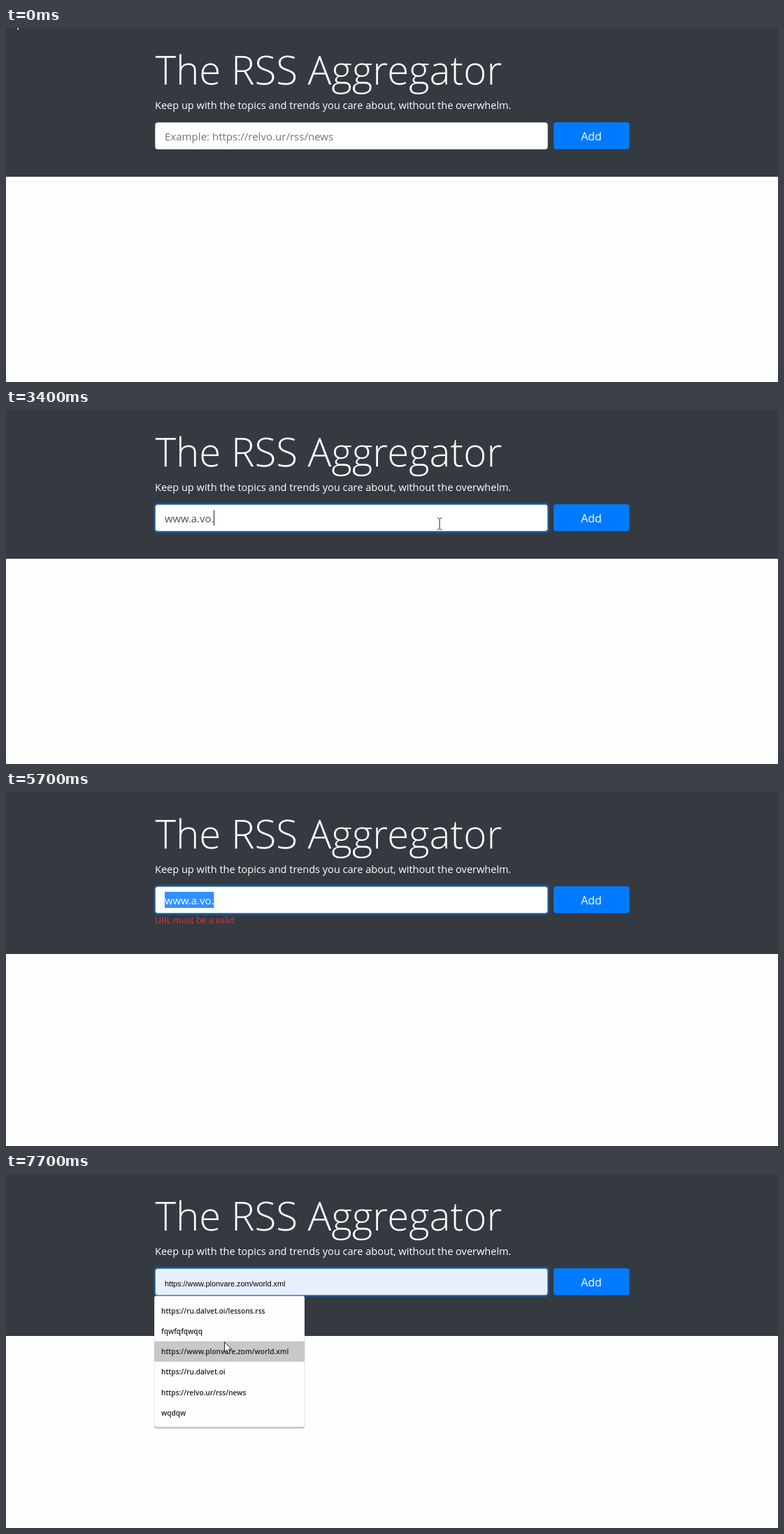
Animation of 1104 by 507 pixels, one loop 8000 ms. Source, as an HTML page:

```html
<!DOCTYPE html>
<html lang="en">
<head>
<meta charset="utf-8">
<title>Feed reader</title>
<style>
  html, body { margin: 0; width: 100%; height: 100%; overflow: hidden; background: #fefefe; }
  svg { display: block; width: 1104px; height: 507px; font-family: "Open Sans", "Noto Sans", sans-serif; }
  text { white-space: pre; }
  .title { font-size: 56.4px; font-weight: 300; fill: #fff; }
  .lead { font-size: 14.55px; fill: #fff; }
  .hint { font-size: 15.05px; fill: #6c757d; }
  .value { font-size: 14.8px; fill: #495057; }
  .preview { font: 10.85px "Liberation Sans", Arial, sans-serif; fill: #000; }
  .add { font-size: 16px; fill: #fff; text-anchor: middle; }
  .error { font-size: 12.4px; fill: #dc3545; }
  .item { font-size: 10.1px; font-weight: 600; fill: #202124; }
</style>
</head>
<body>
<svg viewBox="0 0 1104 507">
  <rect width="1104" height="507" fill="#fefefe"/>
  <rect id="header" width="1104" height="213" fill="#343a40"/>
  <text class="title" x="213.5" y="81">The RSS Aggregator</text>
  <text class="lead" x="213" y="116">Keep up with the topics and trends you care about, without the overwhelm.</text>

  <rect id="ring" x="211" y="132.5" width="566" height="44" rx="5" fill="#007bff" fill-opacity=".35"/>
  <rect id="field" x="213.5" y="135.5" width="561" height="38" rx="3.5" fill="#fff" stroke-width=".85"/>
  <rect id="selection" x="227" y="143" height="23" fill="#3390ff"/>
  <text id="hint" class="hint" x="227" y="161">Example: https://relvo.ur/rss/news</text>
  <text id="value" class="value" x="227" y="161"></text>
  <text id="preview" class="preview" x="227" y="161"></text>
  <rect id="caret" y="143.5" width="1" height="22" fill="#222"/>

  <rect id="button" x="783" y="135" width="108.5" height="38.5" rx="4"/>
  <text class="add" x="837" y="160.5">Add</text>
  <text id="error" class="error" x="213" y="188">URL must be a valid</text>

  <g id="menu">
    <rect x="212" y="175.5" width="215" height="189" rx="3" fill="#000" fill-opacity=".25"/>
    <rect x="212" y="174.5" width="215" height="188" rx="3" fill="#fefefe" stroke="#000" stroke-opacity=".1"/>
    <rect id="active" x="212" width="215" height="29.3" fill="#c8c8c8"/>
  </g>

  <path id="arrow" d="M0 0V14.5L3.4 11.4L5.7 16.6L8 15.6L5.8 10.5H10.4Z" fill="#fff" stroke="#111" stroke-width=".9"/>
  <path id="beam" d="M-3 -8H-.6M.6 -8H3M0 -7.5V7.5M-3 8H-.6M.6 8H3" fill="none" stroke="#222"/>
  <path id="hand" d="M-1.6 1.6a1.6 1.6 0 0 1 3.2 0v5l4.2 1q2 .5 2 2.4v3.2l-1.6 5.3h-7l-4-6.4q-.7-1.7 .9-1.9l2.3 1.6z" fill="#fff" stroke="#111" stroke-width=".9"/>
</svg>
<script>
const LOOP = 8000;
const ITEMS = [
  "https://ru.dalvet.oi/lessons.rss", "fqwfqfqwqq", "https://www.plonvare.zom/world.xml",
  "https://ru.dalvet.oi", "https://relvo.ur/rss/news", "wqdqw"
];
const BLUE = "#007bff", HOVER = "#0069d9", PRESSED = "#0066d4";
const PITCH = 29.25, MENU_TOP = 181;
const TYPED = "www.a.vo.";

const el = {};
document.querySelectorAll("[id]").forEach(node => el[node.id] = node);

ITEMS.forEach((label, i) => {
  const item = document.createElementNS("http://www.w3.org/2000/svg", "text");
  item.setAttribute("class", "item");
  item.setAttribute("x", 222);
  item.setAttribute("y", 199.5 + i * PITCH);
  item.textContent = label;
  el.menu.append(item);
});

const REST = {
  pointer: "arrow", at: [11, -13], chars: 0, caret: false, focus: 0,
  menu: false, active: -1, button: BLUE, error: false, selected: false
};

// Each step changes only the listed parts.
const STEPS = [
  [800, { pointer: "" }],
  [1100, { menu: true }],
  [1300, { focus: .6 }],
  [1400, { focus: 1, caret: true }],
  [1700, { menu: false, chars: 1 }],
  [1800, { chars: 2 }],
  [1900, { chars: 3 }],
  [2200, { chars: 4 }],
  [2300, { chars: 5 }],
  [2500, { chars: 7 }],
  [2700, { chars: 9 }],
  [3100, { caret: false }],
  [3300, { caret: true, pointer: "beam", at: [296, 156] }],
  [3400, { at: [620, 163] }],
  [3500, { pointer: "hand", at: [888, 165], button: HOVER }],
  [3700, { caret: false, at: [872, 155] }],
  [3800, { at: [861, 147.5] }],
  [4100, { focus: .6, button: PRESSED }],
  [4200, { focus: .1 }],
  [4300, { focus: 0, error: true }],
  [4400, { button: HOVER }],
  [4700, { pointer: "beam", at: [740, 156], button: BLUE }],
  [4800, { at: [500, 156] }],
  [4900, { at: [296, 156] }],
  [5400, { focus: .6, caret: true }],
  [5500, { focus: 1, pointer: "" }],
  [5700, { selected: true, caret: false }],
  [6000, { selected: false, chars: 0, caret: true }],
  [6500, { caret: false }],
  [6900, { menu: true, caret: true }],
  [7400, { pointer: "arrow", at: [318, 297], active: 3, caret: false }],
  [7500, { at: [316, 278] }],
  [7600, { at: [314, 258], active: 2 }],
  [7700, { at: [312.5, 240.5] }]
];

function stateAt(time) {
  const state = { ...REST };
  for (const [start, change] of STEPS) {
    if (start <= time) Object.assign(state, change);
  }
  // The pointer travels from the corner to the field in 100 ms hops.
  if (time < 800) {
    const p = Math.max(0, Math.floor(time / 100) - 1) / 7;
    state.at = [11 + 285 * p, -13 + 165 * p];
  }
  return state;
}

function set(node, attrs) {
  for (const name in attrs) node.setAttribute(name, attrs[name]);
}

function show(node, on) {
  node.style.display = on ? "" : "none";
}

function draw(time) {
  const s = stateAt(time);
  const filled = s.active >= 0;

  set(el.header, { height: s.error ? 232 : 213 });
  show(el.error, s.error);
  set(el.button, { fill: s.button, stroke: s.button === PRESSED ? "#005cbf" : "none" });

  set(el.ring, { opacity: s.focus });
  set(el.field, { stroke: s.focus ? "#5a94d0" : "#ced4da", fill: filled ? "#e8f0fe" : "#fff" });

  show(el.hint, !s.chars && !filled);
  el.value.textContent = TYPED.slice(0, s.chars);
  el.value.style.fill = s.selected ? "#fff" : "";
  el.preview.textContent = filled ? ITEMS[s.active] : "";

  const width = s.chars ? el.value.getComputedTextLength() : 0;
  show(el.selection, s.selected);
  set(el.selection, { width });
  show(el.caret, s.caret);
  set(el.caret, { x: Math.round(227 + width) });

  show(el.menu, s.menu);
  show(el.active, filled);
  set(el.active, { y: MENU_TOP + s.active * PITCH });

  for (const kind of ["arrow", "beam", "hand"]) {
    show(el[kind], s.pointer === kind);
    set(el[kind], { transform: `translate(${s.at})` });
  }
}

const began = performance.now();
function tick() {
  draw((performance.now() - began) % LOOP);
  requestAnimationFrame(tick);
}
tick();
</script>
</body>
</html>
```
